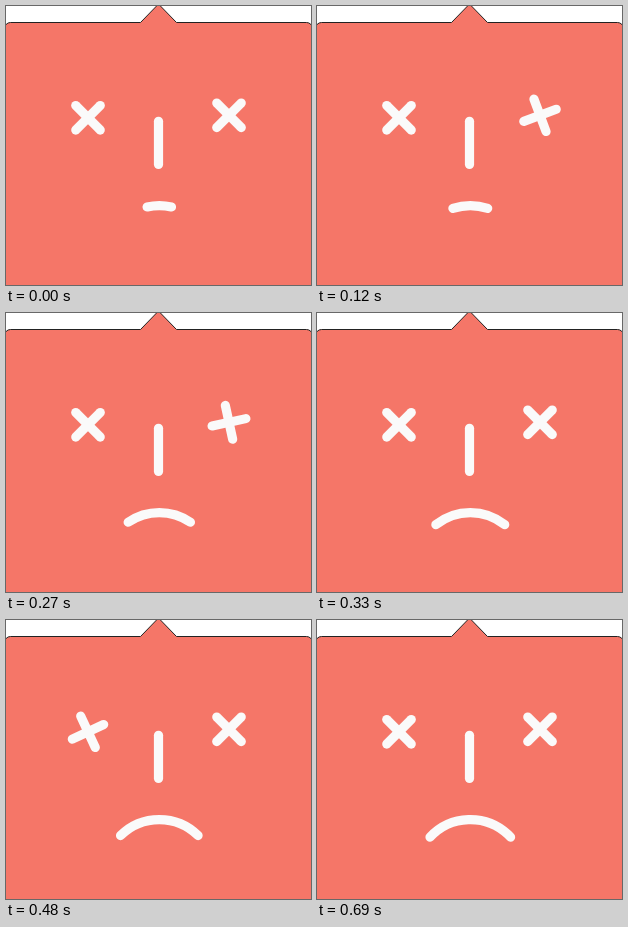
An HTML page with a canvas for the animation above (1.17 s loop, 305x279 px).

```html
<!DOCTYPE html>
<html>
<head>
<meta charset="utf-8">
<title>Sad face</title>
<style>
html, body { margin: 0; width: 100%; height: 100%; overflow: hidden; background: #fff; }
canvas { display: block; }
</style>
</head>
<body>
<canvas id="stage" width="305" height="279"></canvas>
<script>
const ctx = document.getElementById('stage').getContext('2d');
const LOOP = 1170, STEP = 30, LAST = 690;
const SPIN = 332;
const RED = '#f57668', INK = '#fafafa';

const clamp = v => Math.min(1, Math.max(0, v));
const progress = (t, start, length) => clamp((t - start) / length);

// Cubic bezier timing, solved for x by bisection
function bezier(x1, y1, x2, y2) {
  const at = (a, b, s) => 3 * a * s * (1 - s) ** 2 + 3 * b * s * s * (1 - s) + s ** 3;
  return x => {
    let lo = 0, hi = 1;
    for (let i = 0; i < 24; i++) {
      const mid = (lo + hi) / 2;
      if (at(x1, x2, mid) < x) lo = mid; else hi = mid;
    }
    return at(y1, y2, lo);
  };
}
const ease = bezier(0.25, 0.1, 0.25, 1);

function line(x1, y1, x2, y2) {
  ctx.beginPath();
  ctx.moveTo(x1, y1);
  ctx.lineTo(x2, y2);
  ctx.stroke();
}

function bubble() {
  ctx.beginPath();
  ctx.moveTo(-1.5, 285);
  ctx.arcTo(-1.5, 16.5, 10, 16.5, 6);
  ctx.lineTo(134.5, 16.5);
  ctx.lineTo(152.5, -2);
  ctx.lineTo(170.5, 16.5);
  ctx.arcTo(306.5, 16.5, 306.5, 40, 6);
  ctx.lineTo(306.5, 285);
  ctx.closePath();
  ctx.fillStyle = RED;
  ctx.fill();
  ctx.strokeStyle = '#222';
  ctx.lineWidth = 1;
  ctx.stroke();
}

function eye(x, y, turn) {
  const arm = 17.3;
  ctx.save();
  ctx.translate(x, y);
  ctx.rotate(Math.PI / 4 - turn * Math.PI);
  line(-arm, 0, arm, 0);
  line(0, -arm, 0, arm);
  ctx.restore();
}

function mouth(p) {
  const r = 55.1, half = (12.8 + 34.2 * p) * Math.PI / 180;
  const up = -Math.PI / 2;
  ctx.beginPath();
  ctx.arc(153.3, 199.6 + r, r, up - half, up + half);
  ctx.stroke();
}

function draw(t) {
  ctx.clearRect(0, 0, 305, 279);
  bubble();
  ctx.strokeStyle = INK;
  ctx.lineWidth = 9.2;
  ctx.lineCap = 'round';
  eye(82, 111.8, progress(t, 351, SPIN));
  eye(223, 109.3, progress(t, 0, 330));
  line(152.5, 115.3, 152.5, 158.5);
  mouth(ease(progress(t, 28, 660)));
}

function tick() {
  const t = performance.now() % LOOP;
  draw(Math.min(LAST, Math.floor(t / STEP) * STEP));
  requestAnimationFrame(tick);
}
tick();
</script>
</body>
</html>
```
